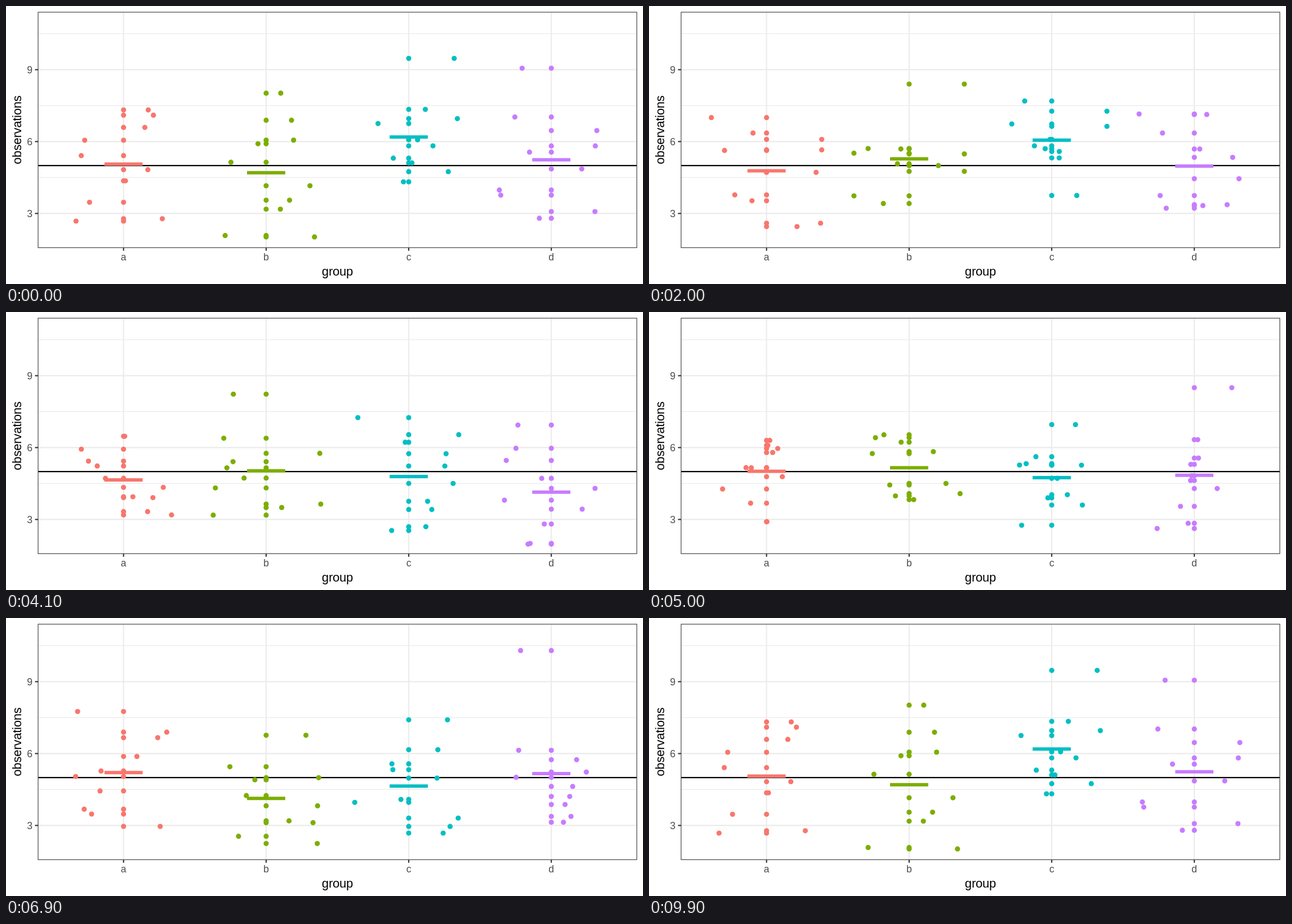
An HTML page for the animation above (10 s loop, 1131 by 495 pixels).

```html
<!DOCTYPE html>
<html lang="en">
<head>
<meta charset="utf-8">
<title>Observations by group</title>
<style>
  html, body { margin: 0; width: 100%; height: 100%; overflow: hidden; background: #fff; }
  svg { display: block; width: 100%; height: 100%; }
  text { font-family: "Liberation Sans", Arial, sans-serif; font-size: 17.6px; fill: #4d4d4d; text-anchor: middle; }
  text.title { font-size: 22px; letter-spacing: -0.2px; fill: #000; }
</style>
</head>
<body>
<svg id="chart" viewBox="0 0 1131 495"></svg>
<script>
const LOOP = 10000, STEP = 100, SIZE = 10, JITTER = 98;
const PANEL = { left: 57, top: 11, right: 1120, bottom: 430.3 };
const COLORS = ['#F8766D', '#7CAE00', '#00BFC4', '#C77CFF'];
const GROUPS = COLORS.map((color, i) => ({ color, name: 'abcd'[i], x: 208.7 + 253.17 * i }));
const yOf = value => 497.4 - value * 128 / 3;

let seed = 41;
const rand = () => (seed = seed * 16807 % 2147483647) / 2147483647;
const gauss = () => (rand() + rand() + rand() + rand() - 2) * 1.73;
const clamp = (v, lo, hi) => Math.max(lo, Math.min(hi, v));
const mean = list => list.reduce((a, b) => a + b) / list.length;
const mix = (a, b, p) => a + (b - a) * p;

// Random values with the given lowest, mean and highest, in random order.
function draw([low, mid, high]) {
  const n = SIZE - 2;
  const centre = (mid * SIZE - low - high) / n;
  const reach = Math.min(high - centre, centre - low);
  const inner = Array.from({ length: n }, (_, i) => (i + rand()) / n);
  const shift = mean(inner);
  return [low, high, ...inner.map(r => centre + (r - shift) * 2 * reach)]
    .map(v => ({ v, dx: (rand() * 2 - 1) * JITTER, key: rand() }))
    .sort((a, b) => a.key - b.key);
}
const sample = (...groups) => groups.flatMap(draw);

// A sample around 5 whose last group reaches up to `top`.
const anySample = top => sample(...GROUPS.map((_, i) => {
  const mid = 5 + 0.5 * gauss();
  return [mid - 1.8 - 0.7 * rand(), mid, i === 3 ? top : mid + 2 + rand()];
}));

// Two samples whose mix at share p is the given blend.
function split(blend, p, low, high) {
  const part = (mid, centre, spread, lo, hi) => {
    const up = Math.min((mid - lo) / p, (hi - mid) / (1 - p));
    const down = Math.max((mid - hi) / p, (lo - mid) / (1 - p));
    const move = clamp(gauss() * spread - 0.6 * (mid - centre), down, up);
    return [mid - p * move, mid + (1 - p) * move];
  };
  const pairs = blend.map(({ dx, v }) => {
    const h = part(dx, 0, 70, -JITTER, JITTER), w = part(v, 5, 2, low, high);
    return [0, 1].map(i => ({ dx: h[i], v: w[i] }));
  });
  return [0, 1].map(i => pairs.map(pair => pair[i]));
}

// Lowest, mean and highest value of each group.
const first = sample([2.78, 5.06, 7.32], [2.02, 4.7, 8.02], [4.32, 6.19, 9.47], [2.8, 5.24, 9.06]);
const second = sample([4.02, 6.08, 9.49], [4.21, 5.52, 7.07], [2.41, 4.88, 9.02], [2.51, 4.29, 7.52]);
const [third, fourth] = split(
  sample([3.28, 4.83, 6.97], [3.96, 5.08, 7.5], [3.3, 5.74, 6.71], [3.35, 4.93, 6.32]), 1 / 3, 2.4, 8.4);
const fifth = sample([3.19, 4.65, 6.47], [3.18, 5.03, 8.23], [2.54, 4.79, 7.25], [2, 4.14, 6.94]);
const sixth = anySample(10.6);
const seventh = sample([4.63, 5.83, 7.73], [2.34, 4.84, 7.15], [2.98, 4.94, 8.44], [4.14, 5.75, 10.95]);
const eighth = anySample(10.3);
const [ninth, tenth] = split(
  sample([3.23, 4.64, 6.63], [4.34, 5.06, 7.1], [3.26, 4.88, 6.34], [3.39, 4.95, 6.22]), 1 / 2, 2.4, 9.2);

// Each sample holds until `end`; the next one is complete at `next`.
const scenes = [
  { points: first, end: 900, next: 1100 },
  { points: second, end: 1900, next: 2000 },
  { points: third, end: 2900, next: 3100 },
  { points: fourth, end: 3900, next: 4100 },
  { points: fifth, end: 4900, next: 5100 },
  { points: sixth, end: 5800, next: 5900 },
  { points: seventh, end: 6800, next: 6900 },
  { points: eighth, end: 7800, next: 7900 },
  { points: ninth, end: 8800, next: 8900 },
  { points: tenth, end: 9800, next: 9900 },
];

const svg = document.getElementById('chart');
function add(tag, attrs, text) {
  const el = document.createElementNS(svg.namespaceURI, tag);
  for (const key in attrs) el.setAttribute(key, attrs[key]);
  if (text) el.textContent = text;
  return svg.appendChild(el);
}
const line = (x1, y1, x2, y2, stroke, width) =>
  add('line', { x1, y1, x2, y2, stroke, 'stroke-width': width });

function drawAxes() {
  const { left, top, right, bottom } = PANEL;
  for (const v of [4.5, 7.5, 10.5]) line(left, yOf(v), right, yOf(v), '#ebebeb', 1.07);
  for (const v of [3, 6, 9]) {
    line(left, yOf(v), right, yOf(v), '#ebebeb', 2.13);
    line(left - 5.5, yOf(v), left, yOf(v), '#333', 2.13);
    add('text', { x: 42.1, y: yOf(v) + 6.1 }, String(v));
  }
  for (const { name, x } of GROUPS) {
    line(x, top, x, bottom, '#ebebeb', 2.13);
    line(x, bottom, x, bottom + 5.5, '#333', 2.13);
    add('text', { x, y: 452.8 }, name);
  }
  add('text', { class: 'title', x: 588.5, y: 480 }, 'group');
  add('text', { class: 'title', transform: 'translate(27 220.5) rotate(-90)' }, 'observations');
  line(left, yOf(5), right, yOf(5), '#000', 2.13);
}

drawAxes();
const marks = GROUPS.map(({ x, color }) => ({
  dots: Array.from({ length: SIZE }, () =>
    [0, 1].map(() => add('circle', { cx: x, r: 4.6, fill: color }))),
  bar: add('rect', { x: x - 33.9, width: 67.8, height: 6, fill: color }),
}));
add('rect', {
  x: PANEL.left, y: PANEL.top, width: PANEL.right - PANEL.left, height: PANEL.bottom - PANEL.top,
  fill: 'none', stroke: '#333', 'stroke-width': 1.1,
});

function pose(time) {
  const t = Math.floor(time / STEP) * STEP;
  const i = scenes.findIndex(s => t < s.next);
  if (i < 0) return first;
  const { points, end, next } = scenes[i];
  if (t < end) return points;
  const p = (t - end + STEP) / (next - end + STEP);
  const target = scenes[(i + 1) % scenes.length].points;
  return points.map((a, k) => ({ dx: mix(a.dx, target[k].dx, p), v: mix(a.v, target[k].v, p) }));
}

function render(time) {
  const points = pose(time);
  marks.forEach(({ dots, bar }, g) => {
    const group = points.slice(g * SIZE, (g + 1) * SIZE);
    dots.forEach(([centre, jitter], i) => {
      const { dx, v } = group[i];
      centre.setAttribute('cy', yOf(v));
      jitter.setAttribute('cx', GROUPS[g].x + dx);
      jitter.setAttribute('cy', yOf(v));
    });
    bar.setAttribute('y', yOf(mean(group.map(d => d.v))) - 3);
  });
}

const start = performance.now();
function tick() {
  render((performance.now() - start) % LOOP);
  requestAnimationFrame(tick);
}
tick();
</script>
</body>
</html>
```
